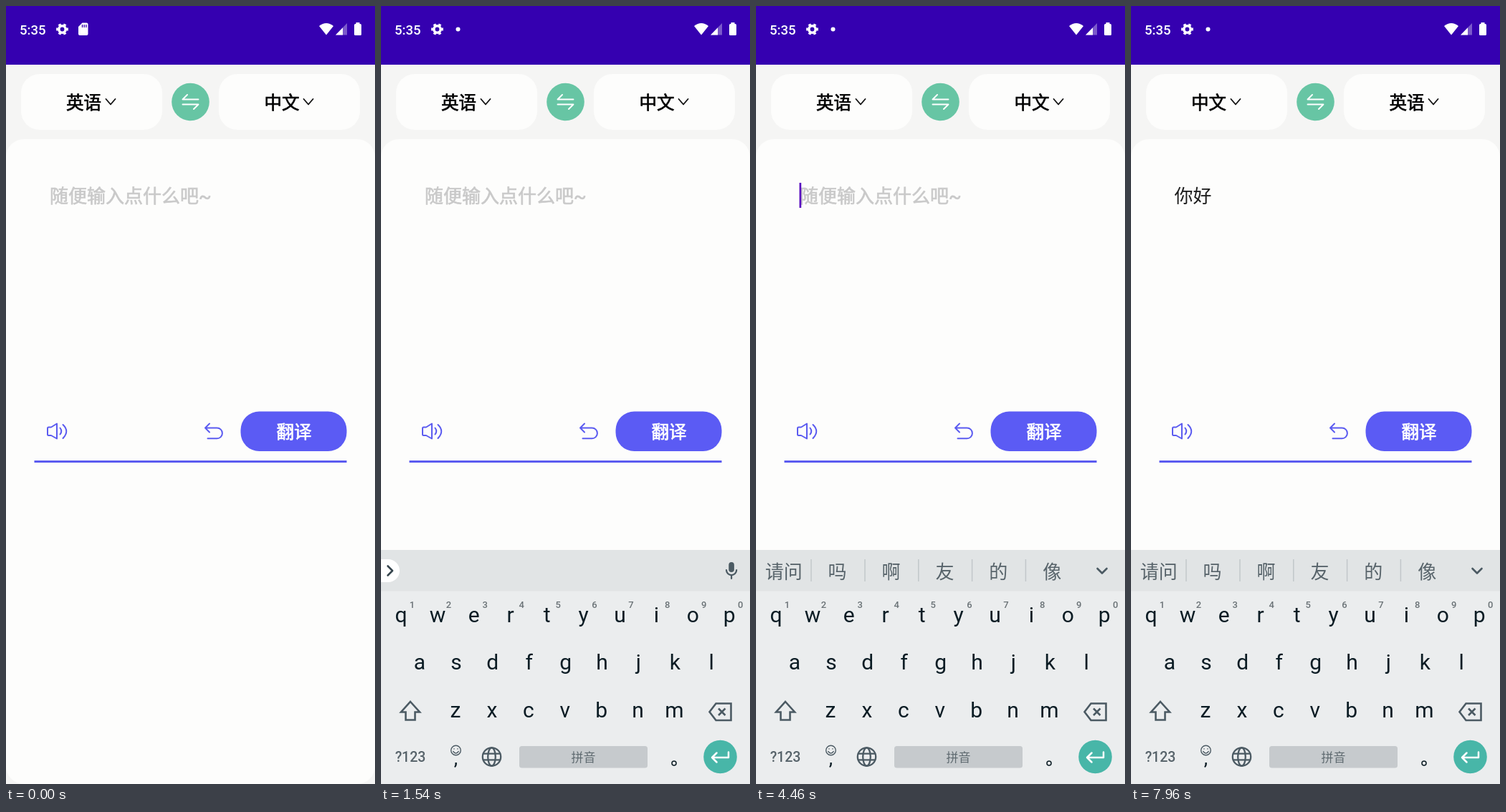
Animation of 515x1087 px, one loop 8000 ms. Source, as an HTML page:

```html
<!DOCTYPE html>
<html lang="zh">
<head>
<meta charset="utf-8">
<title>翻译</title>
<style>
html, body { margin: 0; width: 100%; height: 100%; overflow: hidden; background: #f5f5f4; }
svg { display: block; width: 515px; height: 1087px; }
text { font-family: Roboto, "Noto Sans CJK SC", "Noto Sans CJK", sans-serif; white-space: pre; }
.mid { text-anchor: middle; }
.bold { stroke: currentColor; stroke-width: .7px; fill: currentColor; }
.lang { font-size: 24.5px; color: #000; }
.line { fill: none; stroke-linecap: round; stroke-linejoin: round; }
.accent { stroke: #5b5bf0; stroke-width: 2; }
.tool { stroke: #4b5a63; stroke-width: 2.6; stroke-linejoin: miter; stroke-linecap: butt; }
.key { font-size: 30px; fill: #0b1c24; }
.digit { font-size: 13px; fill: #6a7276; font-weight: 500; }
.cand { font-size: 26px; fill: #57636a; }
</style>
</head>
<body>
<svg viewBox="0 0 515 1087">
  <rect width="515" height="1087" fill="#f5f5f4"/>
  <rect width="515" height="82" fill="#3500b0"/>

  <g fill="#fff">
    <text x="19" y="39.5" font-size="18.5" font-weight="500">5:35</text>
    <g fill="none" stroke="#fff">
      <circle cx="78.5" cy="32.5" r="4.7" stroke-width="3.6"/>
      <circle cx="78.5" cy="32.5" r="7.1" stroke-width="2.6" pathLength="12" stroke-dasharray="1 1" stroke-dashoffset=".5"/>
    </g>
    <g id="card">
      <path d="M106.500 23.500H112.500Q114.500 23.500 114.500 25.500V39Q114.500 41 112.500 41H103Q101 41 101 39V29Z"/>
      <path d="M106.500 26v4M109.200 26v4M111.900 26v4" stroke="#3500b0" stroke-width="1.300"/>
    </g>
    <circle id="dot" cx="107.500" cy="32.500" r="3"/>
    <path d="M447 40.500L437 28Q447 20 457 28Z"/>
    <path d="M460 40.500H476V24Z" opacity=".35"/>
    <path d="M460 40.500H470V30.200Z"/>
    <rect x="486" y="25" width="10" height="16" rx="1.500"/>
    <rect x="488.500" y="23" width="5" height="4"/>
  </g>

  <g fill="#fdfdfc">
    <rect x="21" y="95" width="197" height="78" rx="26"/>
    <rect x="297" y="95" width="197" height="78" rx="26"/>
    <rect y="186" width="515" height="901" rx="25"/>
  </g>
  <text id="from" class="lang bold mid" x="108.500" y="143.500"></text>
  <text id="to" class="lang bold mid" x="385" y="143.500"></text>
  <path class="line" stroke="#111" stroke-width="1.800" d="M139.500 130l6.500 7.500 6.500-7.500M415.500 130l6.500 7.500 6.500-7.500"/>
  <g id="swap">
    <circle cx="257.500" cy="134" r="26.300" fill="#67c5a4"/>
    <path class="line" stroke="#fff" stroke-width="1.900" d="M268.500 130.500H246.500L253 124M246.500 137.500H268.500L262 144"/>
  </g>

  <text id="hint" class="bold" x="61" y="275" font-size="26" color="#c9c9c9">随便输入点什么吧~</text>
  <text id="typed" x="60.500" y="275" font-size="26" fill="#1c1c1c">你好</text>
  <rect id="caret" y="247" width="2.700" height="35" fill="#5a0fc0"/>

  <g class="line accent">
    <path d="M59.500 588.500H63L71 583.500V604.500L63 600H59.500Q58 600 58 598.500V590Q58 588.500 59.500 588.500Z"/>
    <path d="M75.500 589.500Q79 594 75.500 598.500M79.500 585Q89 594 79.500 604"/>
    <path d="M284 583.500L278 589.500L284 595.500M278 589.500H294.500a7.400 7.400 0 0 1 0 14.800H281.500"/>
  </g>
  <rect x="327.500" y="566.500" width="148" height="55.500" rx="26" fill="#5b5bf4"/>
  <text class="bold mid" x="402" y="604" font-size="24.500" color="#fff">翻译</text>
  <rect x="39.500" y="635" width="436" height="3" fill="#5b5bf0"/>

  <g id="board">
    <g id="tab">
      <path id="tabShape" fill="#ebedee"/>
      <text id="pinyin" x="13.500" y="754.500" font-size="20" fill="#111"></text>
    </g>
    <rect y="760" width="515" height="58" fill="#e1e4e5"/>
    <rect y="817.500" width="515" height="270" fill="#ebedee"/>
    <g id="idle">
      <path d="M0 773H10a16 16 0 0 1 0 32H0Z" fill="#fff"/>
      <path class="line" stroke="#37464e" stroke-width="2.600" d="M9.500 782.500l6.500 6.500-6.500 6.500"/>
      <rect x="485.300" y="777" width="7.600" height="14" rx="3.800" fill="#4b5a63"/>
      <path class="line" stroke="#4b5a63" stroke-width="2.200" d="M482 788a7.100 7.100 0 0 0 14.200 0M489.100 795.500V800"/>
    </g>
    <g id="strip">
      <path stroke="#c2c7ca" stroke-width="1.500" d="M77 773v31M152 773v31M226.800 773v31M301.600 773v31M376.400 773v31"/>
      <path class="line" stroke="#4b5a63" stroke-width="2.600" d="M476.500 786l6.500 6.500 6.500-6.500"/>
    </g>
    <g id="keys"></g>

    <path id="shift" class="line tool" d="M41 972L54 986.500H47.500V997.500H34.500V986.500H28Z"/>
    <g id="split" fill="#3c4a52">
      <text x="25" y="994" font-size="24">‘</text>
      <text x="32" y="994" font-size="24">词</text>
    </g>
    <path class="line tool" d="M467.500 974.500H488.500V998H467.500L458.500 986.200ZM471 981.500l9.500 9.500M480.500 981.500l-9.500 9.500"/>
    <text class="mid" x="41" y="1056" font-size="19.500" fill="#57636a" font-weight="500">?123</text>
    <g class="line" stroke="#4b5a63" stroke-width="1.400">
      <circle cx="104.500" cy="1040" r="6.800"/>
      <path d="M100.800 1041.500Q104.500 1046.500 108.200 1041.500M102 1037.700v.4M107 1037.700v.4"/>
    </g>
    <text class="mid" x="104.500" y="1060" font-size="27" fill="#0b1c24">,</text>
    <g class="line" stroke="#4b5a63" stroke-width="2.300">
      <circle cx="154.500" cy="1049" r="12.700"/>
      <ellipse cx="154.500" cy="1049" rx="5.300" ry="12.700"/>
      <path d="M143 1044.700h23M143 1053.300h23"/>
    </g>
    <rect x="193" y="1034" width="179" height="30.500" rx="3.500" fill="#c6cacd"/>
    <text class="mid" x="282.500" y="1056" font-size="17" fill="#5f6a70">拼音</text>
    <circle cx="409" cy="1058" r="3" fill="none" stroke="#0b1c24" stroke-width="1.500"/>
    <circle cx="473.500" cy="1049" r="23.300" fill="#48b6a8"/>
    <path class="line" stroke="#fff" stroke-width="2.500" stroke-linecap="butt" d="M485 1042.500V1050H462M468.500 1043.500L462 1050L468.500 1056.500"/>

    <g id="popup">
      <rect width="50.500" height="147" rx="4" fill="url(#pop)" style="filter: drop-shadow(0 2px 2px #0005)"/>
      <text id="popKey" class="mid" x="25" y="50" font-size="36" fill="#37464e"></text>
      <text id="popMore" class="mid" x="38" y="67" font-size="17" fill="#37464e">…</text>
    </g>
  </g>
  <linearGradient id="pop" x2="0" y2="1">
    <stop stop-color="#d5d7d8"/><stop offset="1" stop-color="#dddfe0"/>
  </linearGradient>
</svg>
<script>
const LOOP = 8000, STEP = 50.9;
const FOCUS = 1000, RISE = [1040, 1260], COMMIT = 4500, SWAP = 6060;

const $ = id => document.getElementById(id);
const show = (id, on) => $(id).setAttribute('visibility', on ? 'inherit' : 'hidden');
const clamp = v => Math.min(1, Math.max(0, v));
const ramp = (t, a, b) => clamp((t - a) / (b - a));

function label(parent, cls, x, y, str = '') {
  const el = document.createElementNS('http://www.w3.org/2000/svg', 'text');
  el.setAttribute('class', cls + ' mid');
  el.setAttribute('x', x);
  el.setAttribute('y', y);
  el.textContent = str;
  $(parent).append(el);
  return el;
}

const places = {};
[['qwertyuiop', 28, 861], ['asdfghjkl', 54, 927], ['zxcvbnm', 104, 993.5]].forEach(([row, x0, y]) =>
  [...row].forEach((ch, i) => {
    const x = x0 + STEP * i;
    places[ch] = { x, y };
    label('keys', 'key', x, y, ch);
    if (y === 861) label('keys', 'digit', x + 15.5, 840.5, (i + 1) % 10);
  }));

const slots = Array.from({ length: 6 }, (_, i) => label('strip', 'cand', 38.7 + 74.9 * i, 799.5));

// start time, composed pinyin, candidates
const stages = [
  [0, '', ''],
  [2760, 'n', '你 能 呢 您 那 内'],
  [3270, 'ni', '你 呢 尼 泥 逆 拟'],
  [3600, 'ni h', '你好 你会 你还 你和 你 呢'],
  [3840, 'ni ha', '你好 你还 你 呢 尼 泥'],
  [4080, 'ni hao', '你好 拟好 你 呢 尼 泥'],
  [4420, '', '请问 吗 啊 友 的 像']
];
const presses = [['n', 2660], ['i', 3160], ['h', 3510], ['a', 3750], ['o', 3990]];
const HOLD = 110;

let stage = null;
function setStage(next) {
  if (next === stage) return;
  stage = next;
  const [, pinyin, list] = stage, words = list.split(' ');
  show('idle', !list);
  show('strip', list);
  slots.forEach((el, i) => el.textContent = words[i] || '');
  slots[0].style.fill = pinyin ? '#0b0f12' : '';
  show('tab', pinyin);
  show('shift', !pinyin);
  show('split', pinyin);
  $('pinyin').textContent = pinyin;
  const w = $('pinyin').getComputedTextLength() + 27;
  $('tabShape').setAttribute('d', `M0 733H${w - 5}q5 0 5 5V760H0Z`);
}

function setPopup(t) {
  const hit = presses.find(([, at]) => t >= at && t < at + HOLD);
  show('popup', hit);
  if (!hit) return;
  const { x, y } = places[hit[0]];
  $('popup').setAttribute('transform', `translate(${x - 25} ${y - 128})`);
  $('popKey').textContent = hit[0];
  show('popMore', 'niao'.includes(hit[0]));
}

function draw(t) {
  const up = ramp(t, ...RISE), ease = 1 - (1 - up) ** 3;
  show('board', up > 0);
  $('board').setAttribute('transform', `translate(0 ${(1 - ease) * 330})`);
  show('card', t < RISE[0]);
  show('dot', t >= RISE[0]);

  setStage(stages.findLast(s => t >= s[0]));
  setPopup(t);

  const done = t >= COMMIT;
  show('hint', !done);
  show('typed', done);
  show('caret', t >= FOCUS && Math.floor((t - FOCUS) / 500) % 2 === 0);
  $('caret').setAttribute('x', done ? 113 : 60.5);

  const press = ramp(t, 5840, 5940) - ramp(t, 6040, 6240);
  $('swap').setAttribute('opacity', 1 - .27 * press);
  const pair = t < SWAP ? ['英语', '中文'] : ['中文', '英语'];
  $('from').textContent = pair[0];
  $('to').textContent = pair[1];
}

const start = performance.now();
function tick() {
  draw((performance.now() - start) % LOOP);
  requestAnimationFrame(tick);
}
tick();
</script>
</body>
</html>
```
